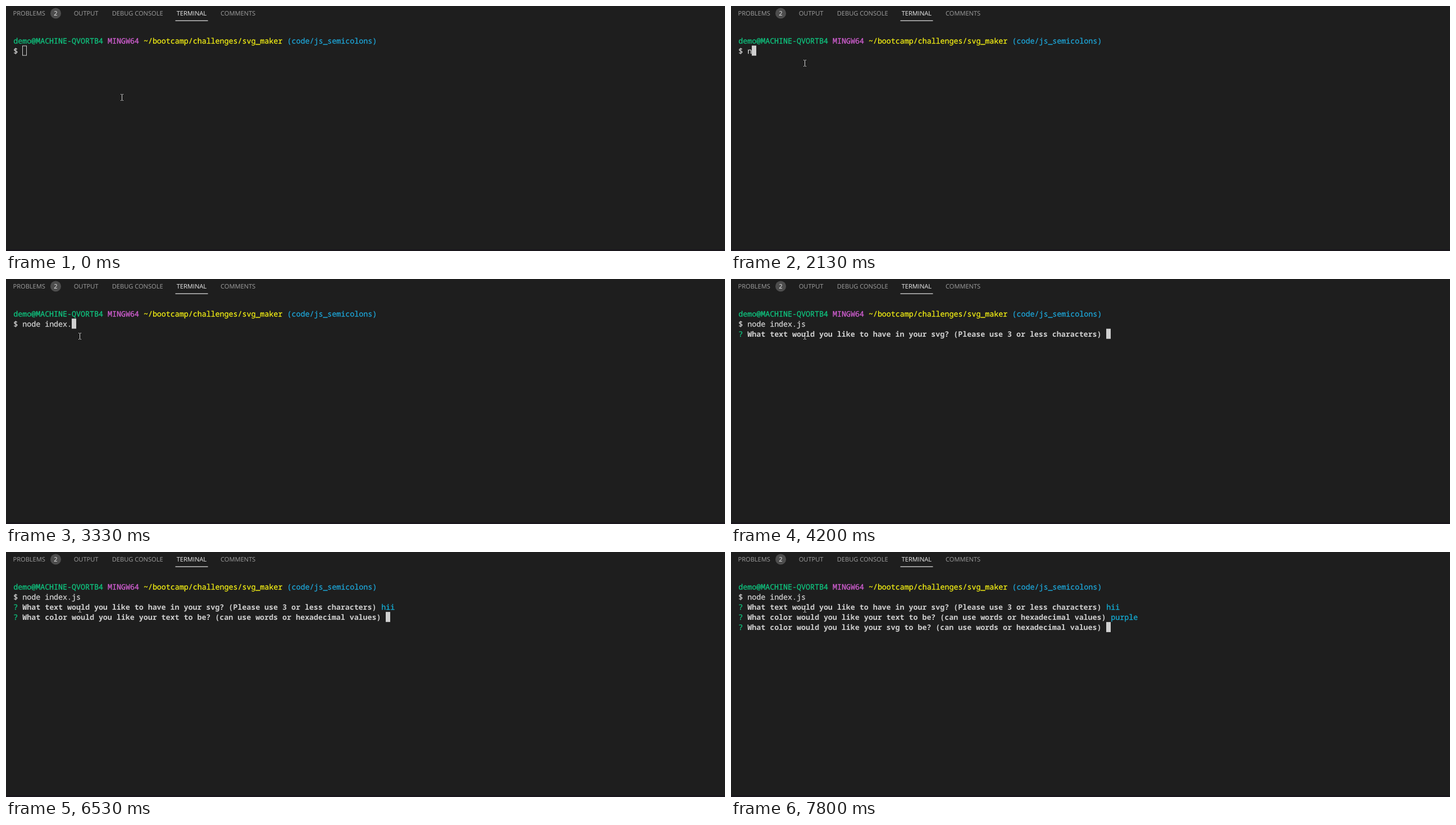
These frames come from a looping animation (1280x437 px, 8 s). An HTML page:

```html
<!DOCTYPE html>
<html lang="en">
<head>
<meta charset="utf-8">
<title>Terminal</title>
<style>
  html, body { margin: 0; width: 100%; height: 100%; overflow: hidden; background: #1e1e1e; }
  svg { display: block; width: 1280px; height: 437px; }
  text { white-space: pre; text-rendering: geometricPrecision; }
  .tab { font: 11.1px "Open Sans", "Noto Sans", sans-serif; fill: #a0a0a0; }
  .active { fill: #efefef; }
  .mono { font: 13.313px "Noto Sans Mono", "DejaVu Sans Mono", monospace; stroke-width: 0.3px; }
  .bold { font-weight: 700; stroke-width: 0; }
</style>
</head>
<body>
<svg id="stage" viewBox="0 0 1280 437" xmlns="http://www.w3.org/2000/svg">
  <rect width="1280" height="437" fill="#1e1e1e"/>
  <rect y="434" width="1280" height="3" fill="#1a171d"/>
  <text class="tab" x="12.5" y="17">PROBLEMS</text>
  <circle cx="88.5" cy="13" r="9.5" fill="#4d4d4d"/>
  <text class="tab active" x="88.5" y="17" text-anchor="middle">2</text>
  <text class="tab" x="120.7" y="17">OUTPUT</text>
  <text class="tab" x="188.7" y="17">DEBUG CONSOLE</text>
  <text class="tab active" x="303.7" y="17">TERMINAL</text>
  <rect x="301.5" y="25.6" width="58" height="1.2" fill="#e7e7e7"/>
  <text class="tab" x="382" y="17">COMMENTS</text>
</svg>
<script>
const LOOP = 8000, CELL = 7.988, LEFT = 13, ROW = 18.1, TICK = 200 / 3;
const GREEN = '#0fc47f', CYAN = '#14aed6', PLAIN = '#d0d0d0';
const stage = document.getElementById('stage');

function add(tag, attrs) {
  const el = document.createElementNS('http://www.w3.org/2000/svg', tag);
  for (const key in attrs) el.setAttribute(key, attrs[key]);
  stage.appendChild(el);
  return el;
}

const colX = col => LEFT + col * CELL;

function paint(el, color) {
  el.style.fill = el.style.stroke = color;
}

function print(row, col, str, color = PLAIN, bold = false) {
  const el = add('text', {
    class: bold ? 'mono bold' : 'mono', x: colX(col) + 0.3, y: 67 + row * ROW
  });
  paint(el, color);
  el.textContent = str;
  return el;
}

const show = (el, on) => el.setAttribute('visibility', on ? 'visible' : 'hidden');

// Shell prompt
print(0, 0, 'demo@MACHINE-QVORTB4', GREEN);
print(0, 21, 'MINGW64', '#d25fd2');
print(0, 29, '~/bootcamp/challenges/svg_maker', '#f2ee14');
print(0, 61, '(code/js_semicolons)', '#1ea6d8');
print(1, 0, '$');

// Each line appears at start; keys holds one time per typed character
const lines = [
  { start: 0, row: 1, col: 2, answer: 'node index.js', end: 3730, done: PLAIN,
    keys: [2130, 2270, 2400, 2530, 2670, 2730, 2800, 2930, 3000, 3200, 3330, 3400, 3530] },
  { start: 4200, row: 2, end: 6530, done: CYAN, answer: 'hii', keys: [6070, 6200, 6330],
    ask: 'What text would you like to have in your svg? (Please use 3 or less characters) ' },
  { start: 6530, row: 3, end: 7800, done: CYAN, answer: 'purple',
    keys: [7130, 7200, 7330, 7400, 7600, 7670],
    ask: 'What color would you like your text to be? (can use words or hexadecimal values) ' },
  { start: 7800, row: 4, end: LOOP, done: CYAN, answer: '', keys: [],
    ask: 'What color would you like your svg to be? (can use words or hexadecimal values) ' }
];

for (const line of lines) {
  line.parts = [];
  if (line.ask) {
    line.col = line.ask.length + 2;
    line.parts = [print(line.row, 0, '?', GREEN), print(line.row, 2, line.ask, PLAIN, true)];
  }
  line.typed = print(line.row, line.col, '');
}

const block = add('rect', {});
const mouse = add('path', {
  d: 'M-2.5 -5.5H-.8M.8 -5.5H2.5M0 -5V5M-2.5 5.5H-.8M.8 5.5H2.5',
  fill: 'none', stroke: '#d8d8d8', 'stroke-width': 1
});

function placeBlock(row, col, focused) {
  const inset = focused ? 0 : 0.5;
  block.setAttribute('x', Math.round(colX(col)) + inset);
  block.setAttribute('y', 52.5 + row * ROW + inset);
  block.setAttribute('width', 8 - 2 * inset);
  block.setAttribute('height', 18 - 2 * inset);
  block.setAttribute('fill', focused ? PLAIN : 'none');
  block.setAttribute('stroke', focused ? 'none' : PLAIN);
}

function moveMouse(t) {
  const p = Math.min(1, Math.floor((t + 4) / TICK) / 9);
  const ease = p * p * (3 - 2 * p);
  const x = Math.floor(206 - 75 * ease) + 0.5;
  const y = Math.round(163 - 61 * ease);
  mouse.setAttribute('transform', `translate(${x} ${y})`);
}

function render(t) {
  let row = 2, col = 0;
  for (const line of lines) {
    const count = line.keys.filter(k => k <= t).length;
    const on = t >= line.start;
    line.parts.forEach(el => show(el, on));
    line.typed.textContent = line.answer.slice(0, count);
    paint(line.typed, t >= line.end ? line.done : PLAIN);
    if (on && t < line.end) {
      row = line.row;
      col = line.col + count;
    }
  }
  placeBlock(row, col, t >= 730);
  moveMouse(t);
}

const begin = performance.now();
function tick() {
  render((performance.now() - begin) % LOOP);
  requestAnimationFrame(tick);
}
render(0);
requestAnimationFrame(tick);
</script>
</body>
</html>
```
